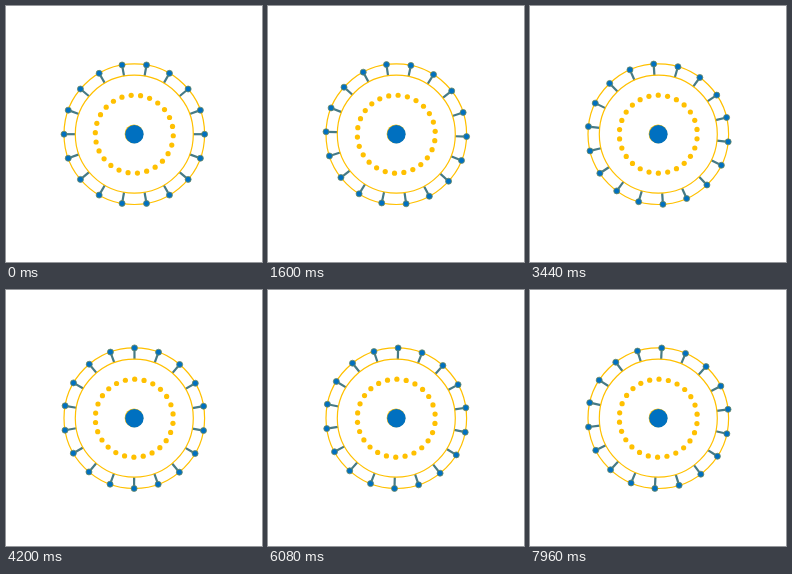
An HTML page with a canvas for the animation above (8000 ms loop, 256x256 px).

```html
<!DOCTYPE html>
<html lang="en">
<head>
<meta charset="utf-8">
<title>Turning wheel</title>
<style>
  html, body { margin: 0; width: 100%; height: 100%; overflow: hidden; background: #fff; }
  canvas { display: block; width: 256px; height: 256px; }
</style>
</head>
<body>
<canvas id="stage" width="256" height="256"></canvas>
<script>
const ctx = document.getElementById('stage').getContext('2d');
const BLUE = '#0070c0', GOLD = '#ffc000', EDGE = '#6f8a60', SPOKE = '#467a86';
const CX = 128.3, CY = 128.2;
const LOOP = 8000, STEP = 40, TURN = 122; // TURN: steps per revolution
const RIM = 70.3, INNER = 59, BEADS = 39;
const TAU = Math.PI * 2;

function disc(x, y, r, fill, edge, width) {
  ctx.beginPath();
  ctx.arc(x, y, r, 0, TAU);
  if (fill) {
    ctx.fillStyle = fill;
    ctx.fill();
  }
  if (edge) {
    ctx.strokeStyle = edge;
    ctx.lineWidth = width;
    ctx.stroke();
  }
}

function around(count, start, paint) {
  for (let i = 0; i < count; i++) {
    const a = start + i * TAU / count;
    paint(Math.cos(a), Math.sin(a));
  }
}

function draw(ms) {
  const spin = Math.floor((ms % LOOP) / STEP) / TURN * TAU;
  ctx.fillStyle = '#fff';
  ctx.fillRect(0, 0, 256, 256);

  around(18, -spin, (c, s) => {
    ctx.strokeStyle = SPOKE;
    ctx.lineWidth = 2.2;
    ctx.beginPath();
    ctx.moveTo(CX + c * INNER, CY + s * INNER);
    ctx.lineTo(CX + c * RIM, CY + s * RIM);
    ctx.stroke();
  });
  disc(CX, CY, RIM, null, GOLD, 1.2);
  disc(CX, CY, INNER, null, GOLD, 1.2);
  around(18, -spin, (c, s) => disc(CX + c * RIM, CY + s * RIM, 3, BLUE, EDGE, 0.8));

  // The bead ring turns against the rim.
  around(26, spin + TAU / 26 / 6, (c, s) => disc(CX + c * BEADS, CY + s * BEADS, 2.6, GOLD));

  disc(CX - 0.3, CY - 0.3, 9.4, GOLD);
  disc(CX + 0.1, CY + 0.1, 9.2, BLUE);
}

function tick() {
  draw(performance.now());
  requestAnimationFrame(tick);
}
tick();
</script>
</body>
</html>
```
